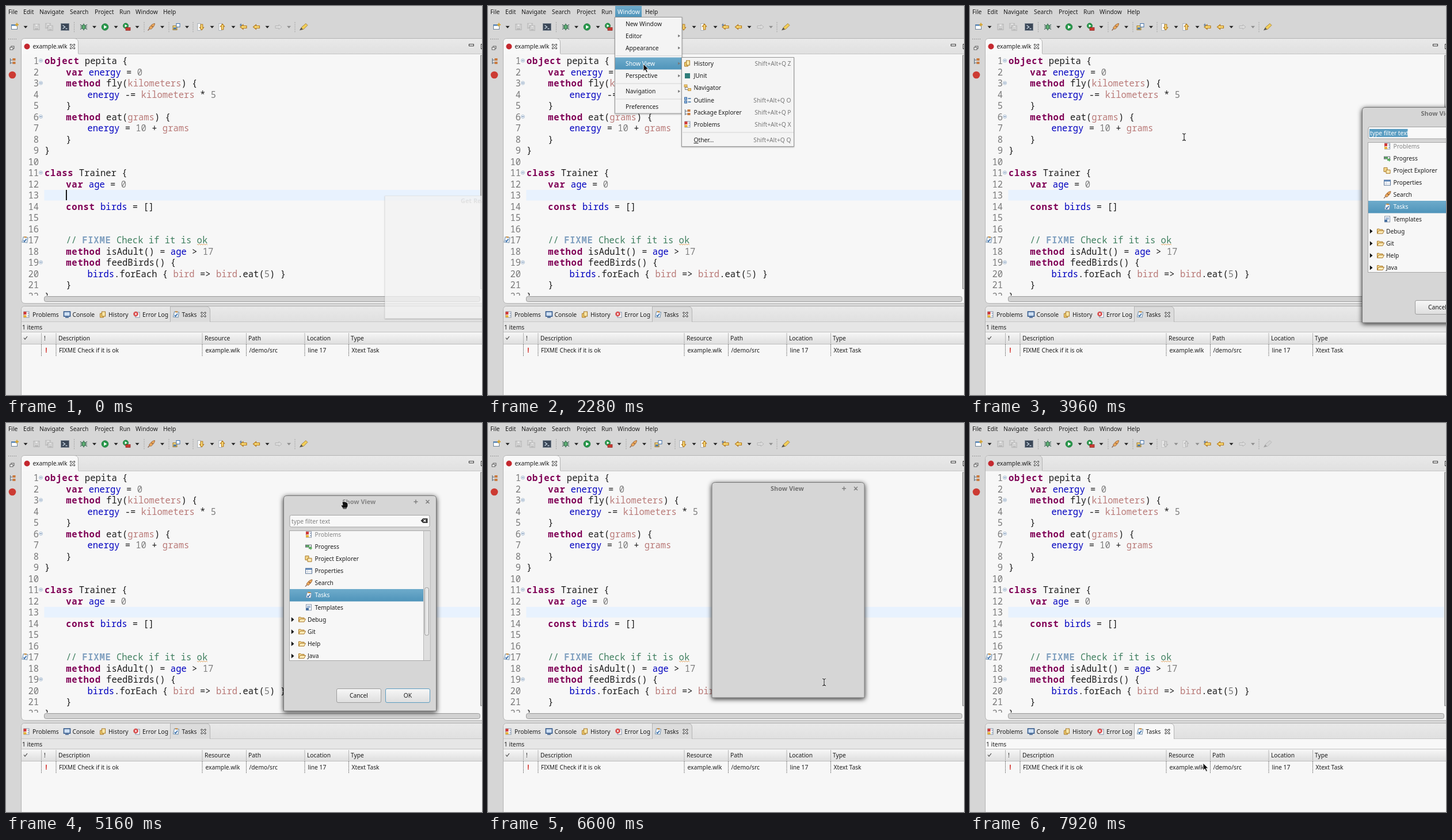
These frames come from a looping animation (827 px wide and 677 px high, 8 s). An HTML page:

```html
<!DOCTYPE html>
<html lang="en">
<head>
<meta charset="utf-8">
<title>Show View</title>
<style>
html, body { margin: 0; width: 100%; height: 100%; overflow: hidden; background: #d6d6d6; }
svg { display: block; }
text { font: 10.25px "Noto Sans", "Open Sans", sans-serif; white-space: pre; }
text.code { font: 15.52px "Noto Sans Mono", "DejaVu Sans Mono", monospace; }
.code .kw, .code .tag { font-weight: bold; letter-spacing: .78px; }
.code .kw { fill: #7f0055; }
.code .tag { fill: #7f9fbf; }
.code .field { fill: #0000c0; }
.code .num { fill: #7d7d7d; }
.code .par { fill: #b97a78; }
text.title { font-size: 10.9px; font-weight: bold; }
.off { filter: grayscale(1); opacity: .4; }
</style>
</head>
<body>
<svg id="stage" width="827" height="677" viewBox="0 0 827 677"></svg>
<script>
const INK = '#1c1c1c';

const text = (x, mid, s, fill = INK, extra = '') =>
  `<text x="${x}" y="${mid + 3.7}" fill="${fill}" ${extra}>${s}</text>`;
const rect = (x, y, w, h, fill, extra = '') =>
  `<rect x="${x}" y="${y}" width="${w}" height="${h}" fill="${fill}" ${extra}/>`;
const line = (d, color, w = 1, extra = '') =>
  `<path d="${d}" fill="none" stroke="${color}" stroke-width="${w}" ${extra}/>`;
const fill = (d, color, extra = '') => `<path d="${d}" fill="${color}" ${extra}/>`;
const dot = (r, color, extra = '') => `<circle r="${r}" fill="${color}" ${extra}/>`;
const group = (id, body, extra = '') => `<g id="${id}" ${extra}>${body}</g>`;

const paper = rect(-4.5, -5, 9, 10, '#fff', 'stroke="#8191a8"');
const board = fill('M-3-5L5-4L3.5 5L-5 4Z', '#eef3f8', 'stroke="#7391ad" stroke-width="1.1"');
const arrowLeft = 'M-6 0L-1-4V-2H5V2H-1V4Z';
const gold = 'stroke="#b57a1c" stroke-width="1.2"';
const floppy = rect(-5, -5, 10, 10, '#d4d4d4', 'stroke="#b2b2b2"') + rect(-2.5, -5, 5, 4, '#e6e6e6', 'stroke="#bbb" stroke-width=".7"') + rect(-3, 2, 6, 3, '#bbb');
const play = dot(5.8, '#27984a', 'stroke="#156f31" stroke-width=".8"') + fill('M-1.8-3.2L3.4 0L-1.8 3.2Z', '#fff');

// Small pictures, centred on 0,0
const icons = {
  fresh: rect(-5.5, -4, 10, 8, '#fff', 'stroke="#6d8296"') + rect(-5.5, -4, 10, 2, '#4d83bd') + fill('M4-7V-1M1-4H7', 'none', 'stroke="#d7a32c" stroke-width="1.8"'),
  save: floppy,
  saveAll: `<g transform="translate(-2 -2) scale(.85)">${floppy}</g><g transform="translate(2 2) scale(.85)">${floppy}</g>`,
  shell: rect(-7, -6, 14, 12, '#3a4656', 'stroke="#7d8894"') + line('M-4-3L0 0L-4 3M1 3H4', '#c5d4e2', 1.5),
  bug: line('M-6-4L6 4M6-4L-6 4M-6 0H6M0-6V6', '#2f5b4a', 1.1) + '<ellipse rx="3" ry="4" fill="#5fae73" stroke="#2c6547"/>',
  play,
  tool: `<g transform="translate(-1 -2) scale(.8)">${play}</g>` + rect(-1, 1, 8, 5, '#c83b32', 'stroke="#8c1d1a" stroke-width=".7"'),
  rocket: fill('M6-6C2-6-2-2-4 2L-1 4C2 2 6-2 6-6Z', '#eda95a', 'stroke="#956036" stroke-width=".9"') + line('M-3 3L-6 6M0-2L3 0', '#87583e', 1.3),
  blocks: rect(-6, -2, 7, 7, '#f2d57b', 'stroke="#a57b27"') + rect(0, -6, 6, 6, '#fff', 'stroke="#416fa6"') + rect(-5, 1, 5, 3, '#4472a9'),
  down: rect(-5, -6, 5, 12, '#fff', 'stroke="#9aa3ad" stroke-width=".8"') + `<g transform="translate(2 0) rotate(-90) scale(.9)">${fill(arrowLeft, '#f8d873', gold)}</g>`,
  up: rect(-5, -6, 5, 12, '#fff', 'stroke="#9aa3ad" stroke-width=".8"') + `<g transform="translate(1 0) rotate(90) scale(.9)">${fill(arrowLeft, '#f8d873', gold)}</g>`,
  lastEdit: fill(arrowLeft, '#f8d873', gold) + line('M-5-6V-1M-7-3.5H-3', '#48688f'),
  back: fill(arrowLeft, '#f8d873', gold),
  next: `<g transform="scale(-1 1)">${fill(arrowLeft, '#ddd', 'stroke="#b4b4b4"')}</g>`,
  pencil: fill('M-6 5L-3 0L4-6L7-3L0 4Z', '#f2ce57', 'stroke="#99732c" stroke-width=".8"') + fill('M-7 6L-4 1L-1 4Z', '#555'),
  caret: fill('M-3.5-1.8H3.5L0 2.2Z', '#222'),
  problems: paper + rect(-5, -5, 5, 5, '#cf3c3c') + rect(-5, 1, 5, 4, '#e7b23d') + line('M2-2H4M2 2H4', '#456c9c'),
  console: rect(-5.5, -5, 11, 8, '#cfe0f3', 'stroke="#33598c" stroke-width="1.6"') + line('M-3 5H3', '#33598c', 1.5),
  history: fill('M-5-2H1V5H-5Z', '#f6d376', 'stroke="#a67624"') + rect(-2, -5, 6, 8, '#f9e6a5', 'stroke="#a67624"'),
  errorLog: rect(-2, -4, 7, 9, '#fff', 'stroke="#8191a8"') + '<circle cx="-1.5" cy="-1" r="4.2" fill="#d64242"/>' + line('M-3-3L0 1M0-3L-3 1', '#fff', 1.2),
  tasks: board + line('M-2.5 1L-1 3L2.5-1.5', '#2f68a8', 1.5) + line('M-1.5-5L3-4.4', '#c6893b', 2),
  unit: rect(-4.5, -4.5, 9, 9, '#2f7d7a'),
  navigator: line('M-4-4V3H1M-4-1H1', '#777') + rect(-5.5, -5.5, 5, 4, '#f1cd70', 'stroke="#b98531" stroke-width=".8"') + rect(1, 1, 5, 4, '#f1cd70', 'stroke="#b98531" stroke-width=".8"'),
  outline: rect(-5, -5, 4, 4, '#8fb4df', 'stroke="#34689f"') + rect(-5, 1, 4, 4, '#8fb4df', 'stroke="#34689f"') + line('M1-3H6M1 3H6', '#34689f', 1.5),
  packages: line('M-4-5V5M-4-2H0M-4 3H0', '#5c6d7c') + rect(0, -5, 5, 4, '#c9793c') + rect(0, 1, 5, 4, '#c9793c'),
  progress: rect(-5.5, -3, 10, 4, '#fff', 'stroke="#667"') + rect(-5, -2.5, 6, 3, '#4e9e55') + fill('M0 1H3V-1L6 2.5L3 6V4H0Z', '#58ad5d'),
  explorer: fill('M-6-5H0V2H-6Z', '#f6d98c', 'stroke="#a67624"') + fill('M-2-1H5V5H-2Z', '#fbe9b5', 'stroke="#a67624"'),
  properties: rect(-5.5, -4.5, 11, 9, '#fff', 'stroke="#556f93"') + rect(-5.5, -4.5, 11, 2.5, '#5580b5') + line('M-2-2V4M-5 1H5', '#b7c3d2', .8),
  templates: paper + line('M-3-2H3M-3 0H3', '#4f7cb3') + rect(-5, 1, 5, 4, '#476f9f'),
  folder: fill('M-5.5 4V-4H-2L-1-3H4V-1', '#f4d88c', 'stroke="#a9772a"') + fill('M-5.5 4L-3-1H6.5L4 4Z', '#fbeab7', 'stroke="#a9772a"'),
  close: fill('M-4-4H-2L0-1.5L2-4H4V-2L1.5 0L4 2V4H2L0 1.5L-2 4H-4V2L-1.5 0L-4-2Z', '#f8f8f8', 'stroke="#333"'),
  restore: rect(-2, -3, 5, 4, '#fff', 'stroke="#555"') + rect(-4, -1, 5, 4, '#fff', 'stroke="#555"'),
  fold: dot(3, '#e9eff6', 'stroke="#a9bbd0" stroke-width=".9"') + line('M-1.7 0H1.7', '#6785a8'),
  sub: fill('M-1.8-2.5L2 0L-1.8 2.5Z', '#777'),
  erase: fill('M-6 0L-2-4H6V4H-2Z', '#333') + line('M-1-2L3 2M3-2L-1 2', '#fff', 1.3),
  expand: fill('M-2.2-4L2.5 0L-2.2 4Z', '#111')
};
const icon = (name, x, y) => `<g transform="translate(${x} ${y})">${icons[name]}</g>`;
const tools = (list) => list.map(([n, x]) => icon(n, x, 36.5)).join('');

// Editor
const source = `object pepita {
    var energy = 0
    method fly(kilometers) {
        energy -= kilometers * 5
    }
    method eat(grams) {
        energy = 10 + grams
    }
}

class Trainer {
    var age = 0

    const birds = []


    // FIXME Check if it is ok
    method isAdult() = age > 17
    method feedBirds() {
        birds.forEach { bird => bird.eat(5) }
    }
}`.split('\n');
const styles = [
  ['kw', /^(object|class|var|const|method)$/],
  ['field', /^(energy|age|birds)$/],
  ['par', /^(kilometers|grams|bird)$/],
  ['num', /^\d+$/]
];
function paint(s) {
  if (s.includes('//')) return s.replace('FIXME', '<tspan class="tag">FIXME</tspan>');
  return s.replace(/\w+/g, (word) => {
    const hit = styles.find(([, re]) => re.test(word));
    return hit ? `<tspan class="${hit[0]}">${word}</tspan>` : word;
  }).replace(/=> /g, '=&gt; ');
}
const rowY = (n) => 101 + 19.5 * (n - 1);
const codeRows = source.map((s, i) => {
  const y = rowY(i + 1);
  return `<text class="code" x="57" y="${y}" fill="#787878" text-anchor="end">${i + 1}</text>` +
    `<text class="code" x="67" y="${y}" fill="${s.includes('//') ? '#3f7f5f' : INK}">${paint(s)}</text>`;
}).join('');
const folds = [1, 3, 6, 11, 19].map((n) => icon('fold', 60.5, rowY(n) - 6)).join('');

const editor =
  fill('M26.5 510V63Q26.5 56.5 33 56.5H830V517.5H33Q26.5 517.5 26.5 510Z', '#f7f7f7', 'stroke="#b4b4b4"') +
  rect(125, 57, 702, 26.5, 'url(#bar)') +
  line('M125.5 83.5H827', '#c4c4c4') +
  `<path id="editorTab" d="M27 84V63Q27 57 33 57H119Q125.5 57 125.5 63V84Z"/>` +
  line('M125.5 83V63Q125.5 57 119 56.5', '#b4b4b4') +
  `<circle cx="36.5" cy="70.5" r="5" fill="#c4282f"/>` +
  text(46.5, 70.5, 'example.wlk') + icon('close', 115.5, 70.5) +
  rect(804.5, 66.5, 8, 3, '#fff', 'stroke="#333"') + rect(825.5, 66.5, 8, 8, '#fff', 'stroke="#333"') +
  rect(66.5, 320, 757, 18.5, '#e8f2fe') +
  `<g clip-path="url(#page)">${codeRows}${folds}</g>` +
  line('M332 414l2 2 2-2 2 2 2-2 2 2 2-2 2 2 2-2 2 2', '#dd9b55', .9) +
  icon('tasks', 33, 407) +
  rect(824.5, 86, 6, 406, '#c9c9c9', 'stroke="#8d8d8d"') +
  rect(66.5, 505.5, 757, 9, '#d2d2d2', 'rx="3" stroke="#9a9a9a"') +
  rect(104, 320, 1.8, 18, '#000', 'id="caret"');

// Bottom pane
const tabs = [['problems', 35.5, 46, 'Problems'], ['console', 106, 115.5, 'Console'], ['history', 168.5, 178, 'History'],
  ['errorLog', 227, 237, 'Error Log'], ['tasks', 295.5, 305.5, 'Tasks']];
const columns = [[61.5], [87, 91, 92, 'Description', 'FIXME Check if it is ok'], [341, 345, 346.5, 'Resource', 'example.wlk'],
  [417.5, 421, 422.5, 'Path', '/demo/src'], [519, 523, 524.5, 'Location', 'line 17'], [595.5, 599, 600.5, 'Type', 'Xtext Task']];
const pane =
  fill('M26.5 680V529Q26.5 522.5 33 522.5H830V680Z', '#f7f7f7', 'stroke="#b4b4b4"') +
  rect(27, 549, 800, 19, '', 'id="status"') + fill('M27 549V529Q27 523 33 523H827V549Z', 'url(#bar)') +
  line('M27 549.5H827', '#c6c6c6') +
  `<path id="taskTab" d="M285.5 550V523H348Q354.5 523 354.5 530V550" stroke="#b4b4b4"/>` +
  tabs.map(([n, ix, tx, s]) => icon(n, ix, 537) + text(tx, 537, s)).join('') +
  icon('close', 343, 537) + text(28, 559, '1 items') +
  rect(27, 568, 800, 20.5, 'url(#head)') + line('M27 567.5H827M27 588.5H827', '#c0c0c0') +
  line('M31 577.5l2 2.5 4-5', '#444', 1.2) + text(66, 578, '!') + text(68.5, 599.5, '!', '#d3312b', 'font-weight="bold" stroke="#d3312b" stroke-width=".7"') +
  columns.map(([x, hx, rx, head, cell]) => line(`M${x} 569V588`, '#b5b5b5') +
    line(`M${x} 589V610`, '#444', 1, 'stroke-dasharray="1.3 1.3"') +
    (head ? text(hx, 578, head) + text(rx, 599.5, cell) : '')).join('');

// Menu bar and toolbars
const menuBar = [[4, 'File'], [30, 'Edit'], [58, 'Navigate'], [111, 'Search'], [154, 'Project'], [197, 'Run'], [225, 'Window'], [273, 'Help']]
  .map(([x, s]) => text(x, 10, s)).join('');
const toolbar =
  tools([['fresh', 15], ['caret', 34], ['save', 53], ['saveAll', 75], ['shell', 102.5], ['bug', 135], ['caret', 153.5], ['play', 172],
    ['caret', 191], ['tool', 209], ['caret', 228], ['rocket', 252.5], ['caret', 271.5], ['blocks', 296], ['caret', 314.5],
    ['lastEdit', 413], ['back', 435.5], ['caret', 454], ['next', 473]]) +
  `<g class="off">${icon('caret', 491.5, 36.5)}</g>` +
  group('editTools', tools([['down', 338], ['caret', 358], ['up', 375], ['caret', 395], ['pencil', 517]])) +
  [118.5, 240, 283, 325, 502].map((x) => line(`M${x} 28V46`, '#888', 1, 'stroke-dasharray="1.2 2"')).join('');
const sidebar = line('M4 57.5H19', '#777', 1, 'stroke-dasharray="1.2 2"') + icon('restore', 11, 73) +
  icon('packages', 11.5, 96) + '<circle cx="11" cy="120" r="6.3" fill="#cc3b33"/>';

// Menus
const mainItems = [['New Window', 31], ['Editor', 52, 1], ['Appearance', 73, 1], ['Show View', 100, 1], ['Perspective', 121.5, 1],
  ['Navigation', 148.5, 1], ['Preferences', 175.5]];
const viewItems = [['History', 100, 'history', 'Z'], ['JUnit', 121.5, 'unit'], ['Navigator', 142.5, 'navigator'], ['Outline', 164, 'outline', 'O'],
  ['Package Explorer', 185, 'packages', 'P'], ['Problems', 206, 'problems', 'X'],
  ['<tspan text-decoration="underline">O</tspan>ther...', 233.5, '', 'Q']];
const frame = (x, y, w, h) => rect(x, y, w, h, '#f4f4f4', 'stroke="#979797" filter="url(#soft)"');
const menu = group('menu',
  rect(221, 0, 46, 19.5, 'url(#blue)') + text(225, 10, 'Window', '#fff') +
  frame(220.5, 19.5, 116.5, 167.5) + line('M222 86.5H336M222 135H336M222 162H336', '#d4d4d4') +
  rect(221, 0, 115.5, 21, 'url(#blue)', 'id="mainBar"') +
  mainItems.map(([s, y, sub]) => text(239, y, s, INK, 'class="mainItem"') + (sub ? icon('sub', 332, y) : '')).join(''));
const submenu = group('submenu',
  frame(336.5, 89.5, 195, 155) + line('M338 220H531', '#d4d4d4') +
  rect(337, 0, 194.5, 21, 'url(#blue)', 'id="viewBar"') +
  viewItems.map(([s, y, pic, key]) => (pic ? icon(pic, 346.5, y) : '') + text(357.5, y, s, INK, 'class="viewItem"') +
    (key ? text(526.5, y, 'Shift+Alt+Q ' + key, '#777', 'text-anchor="end" class="viewKey"') : '')).join(''));

// Dialog, drawn from its own top left corner
const views = [['problems', 'Problems'], ['progress', 'Progress'], ['explorer', 'Project Explorer'], ['properties', 'Properties'],
  ['rocket', 'Search'], ['tasks', 'Tasks'], ['templates', 'Templates']];
const viewRow = (i) => 68 + 21.15 * i;
const button = (x, w, s, edge) => rect(x + .5, 336.5, w, 24, 'url(#head)', `rx="2.5" stroke="${edge}"`) +
  text(x + w / 2 + .5, 348.5, s, INK, 'text-anchor="middle"');
const list = views.map(([pic, s], i) => icon(pic, 44, viewRow(i)) +
    text(54.5, viewRow(i), s, i === 0 ? '#858585' : i === 5 ? '#fff' : INK)).join('') +
  ['Debug', 'Git', 'Help', 'Java'].map((s, i) => icon('expand', 16, viewRow(i + 7)) + icon('folder', 32, viewRow(i + 7)) +
    text(42, viewRow(i + 7), s)).join('');
const dialog = group('dialog',
  fill('M.5 375V6Q.5 .5 6 .5H260Q265.5 .5 265.5 6V375Z', '#d6d6d6', 'stroke="#777" filter="url(#deep)"') +
  text(131.5, 11.3, 'Show View', '#777', 'class="title" id="title" text-anchor="middle"') +
  line('M226.5 11H233.5M230 7.5V14.5M247.5 8L253.5 14M253.5 8L247.5 14', '#808080', 1.5) +
  group('content',
    rect(11, 34.5, 243, 20.5, '#f8f8f8', 'rx="2.5" stroke="#a2a2a2"') +
    rect(13, 38, 66.5, 14, '#5a9dc2', 'id="mark"') +
    text(14, 44.8, 'type filter text', '#808080', 'id="hint"') + icon('erase', 244.5, 44) +
    rect(10.5, 61.5, 244.5, 226, '#f7f7f7', 'stroke="#a8a8a8"') +
    rect(11, 163, 232, 21.5, 'url(#blue)') +
    `<g clip-path="url(#views)">${list}</g>` +
    rect(243.5, 62, 11, 225, '#dedede') + line('M243.5 62V287', '#b9b9b9') +
    rect(245.5, 160.5, 7, 83, '#e6e6e6', 'rx="3" stroke="#999"') +
    button(92, 77, 'Cancel', '#9c9c9c') + button(177, 77, 'OK', '#5b9cc0')));

const ghost = group('ghost', rect(658.5, 330.5, 180, 213, '#f2f2f2', 'filter="url(#soft)" stroke="#e2e2e2"') +
  text(790, 339.5, 'Get Ready', '#dadada', 'class="title"'));

const beam = 'M-3-6Q0-6 0-4Q0-6 3-6M0-5V5M-3 6Q0 6 0 4Q0 6 3 6';
const pointers =
  group('arrow', fill('M0 0V12.5L3 9.8L5.2 14.5L7.4 13.4L5.2 8.9H9Z', '#111', 'stroke="#f4f4f4" stroke-width=".9"')) +
  group('beam', line(beam, '#fff', 2.6) + line(beam, '#111', 1.1)) +
  group('hand', fill('M-4-4Q-3-6-1-5Q1-6 3-4Q6-4 6-1V3L4 6V8H-3V6L-6 2Q-6 0-3 1Z', '#111', 'stroke="#eee" stroke-width=".9"') +
    line('M-2 6H3', '#ddd', .8));

const gradient = (id, a, b) => `<linearGradient id="${id}" x2="0" y2="1"><stop stop-color="${a}"/><stop offset="1" stop-color="${b}"/></linearGradient>`;
const shadow = (id, y, r, a) => `<filter id="${id}" x="-20%" y="-20%" width="140%" height="140%"><feDropShadow dx="0" dy="${y}" stdDeviation="${r}" flood-opacity="${a}"/></filter>`;
document.getElementById('stage').innerHTML =
  `<defs>${gradient('bar', '#e9e9e9', '#e0e0e0')}${gradient('head', '#f7f7f7', '#dedede')}${gradient('blue', '#6eabcb', '#4f94ba')}
  ${shadow('soft', 1, 1.2, .3)}${shadow('deep', 2, 4, .85)}
  <clipPath id="page"><rect x="27" y="84" width="796" height="420"/></clipPath>
  <clipPath id="views"><rect x="11" y="62" width="232" height="225"/></clipPath></defs>` +
  rect(0, 0, 827, 677, '#d6d6d6') + menuBar + toolbar + sidebar + editor + pane + ghost + dialog + menu + submenu + pointers;

// Motion
const el = (id) => document.getElementById(id);
const all = (name) => [...document.querySelectorAll('.' + name)];
const show = (id, on) => { el(id).style.display = on ? '' : 'none'; };
const move = (id, x, y) => el(id).setAttribute('transform', `translate(${x} ${y})`);
const color = (id, value) => el(id).setAttribute('fill', value);

const mousePath = [[360, 842, 300], [840, 310, 62], [960, 288, 50], [1200, 242, 25], [1440, 222, 16], [1560, 232, 12], [1680, 236, 11],
  [1800, 239, 24], [2160, 252, 99], [2280, 270, 101], [2520, 348, 101], [2640, 357, 118], [3000, 374, 206], [3240, 373, 223],
  [3360, 372, 228], [4200, 372, 228], [4440, 544, 190], [4560, 544, 190], [4680, 750, 190], [4800, 787, 192]];
const afterPath = [[5520, 494, 120], [5640, 494, 120], [6360, 584, 451], [6600, 584, 451], [7320, 56, 645], [7440, 66, 641], [7920, 405, 592]];
const dialogPath = [[4800, 681, 176], [4920, 645, 167], [5160, 482, 126], [5280, 418, 110], [5400, 391, 103], [5520, 388.5, 103]];
const pointerShape = [[0, 'beam'], [840, 'arrow'], [3600, 'beam'], [4680, 'arrow'], [4800, 'hand'], [5520, 'arrow'], [6600, 'beam'], [6840, 'arrow']];
const fade = [[3600, 0], [3720, .4], [3840, 1], [6600, 1], [6720, .4], [6840, 0]];

function along(path, t) {
  const i = path.findIndex(([at]) => at > t);
  if (i === 0) return path[0].slice(1);
  if (i < 0) return path[path.length - 1].slice(1);
  const a = path[i - 1], b = path[i], k = (t - a[0]) / (b[0] - a[0]);
  return a.slice(1).map((v, j) => v + (b[j + 1] - v) * k);
}
const held = (steps, t) => steps.filter(([at]) => at <= t).pop()[1];
const nearest = (items, y) => items.findIndex((item) => Math.abs(item[1] - y) <= 10.6);

function hover(bar, items, picked, names) {
  show(bar, picked >= 0);
  if (picked >= 0) el(bar).setAttribute('y', items[picked][1] - 10.5);
  all(names).forEach((n, i) => n.setAttribute('fill', i === picked ? '#fff' : INK));
}

function draw(time) {
  const t = Math.floor(time / 120) * 120;
  const [dx, dy] = along(dialogPath, t);
  const dragging = t >= 4800 && t < 5520;
  const [mx, my] = dragging ? [dx + 106, dy + 16] : along(t < 4800 ? mousePath : afterPath, t);

  const shape = held(pointerShape, t);
  ['arrow', 'beam', 'hand'].forEach((id) => show(id, id === shape));
  move(shape, mx, my);

  show('caret', t < 3600 && t % 1200 < 600);
  show('ghost', t < 240);
  el('ghost').style.opacity = t < 120 ? .75 : .35;

  const open = t >= 1560 && t < 3600, sub = t >= 2280 && t < 3600;
  show('menu', open);
  show('submenu', sub);
  if (open) hover('mainBar', mainItems, sub ? 3 : nearest(mainItems, my), 'mainItem');
  if (sub) {
    const picked = mx > 337 ? nearest(viewItems, my) : -1;
    hover('viewBar', viewItems, picked, 'viewItem');
    const keyed = viewItems.filter((item) => item[3]);
    all('viewKey').forEach((n, i) => n.setAttribute('fill', keyed[i] === viewItems[picked] ? '#fff' : '#777'));
  }

  const alpha = t < 3600 ? 0 : along(fade, t)[0];
  show('dialog', alpha > 0);
  el('dialog').style.opacity = alpha;
  move('dialog', dx, dy);
  show('content', t >= 3960 && t < 6600);
  const marked = t < 4800 || t >= 5760;
  show('mark', marked);
  color('hint', marked ? '#fff' : '#808080');
  color('title', dragging ? '#858585' : '#707070');

  const paneActive = t >= 7200;
  color('editorTab', paneActive ? '#dcdcdc' : '#f8f8f8');
  color('taskTab', paneActive ? '#f8f8f8' : '#dcdcdc');
  color('status', paneActive ? '#f8f8f8' : '#e6e6e6');
  el('editTools').setAttribute('class', paneActive ? 'off' : '');
}

function tick() {
  draw(performance.now() % 8000);
  requestAnimationFrame(tick);
}
tick();
</script>
</body>
</html>
```
